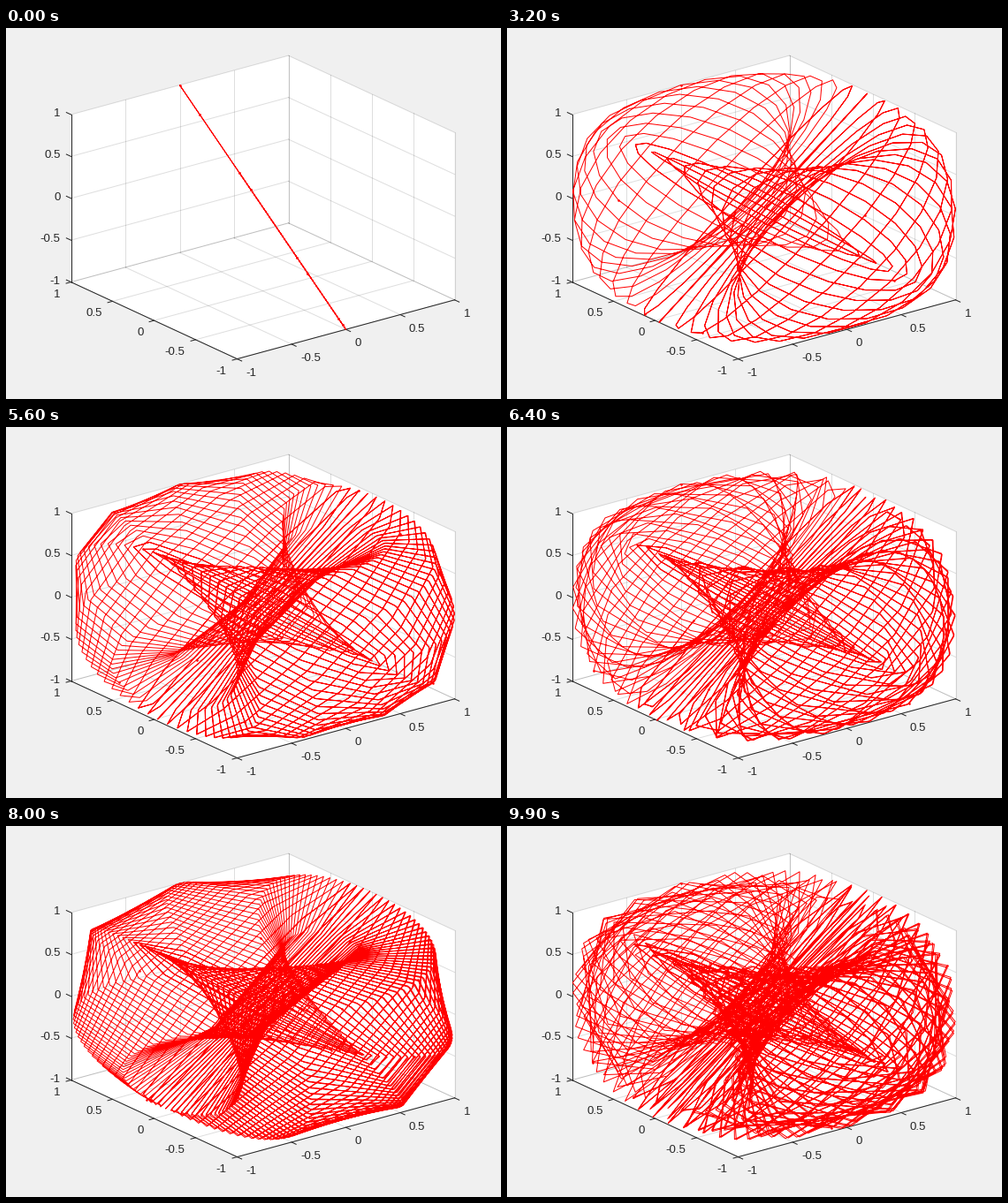
A matplotlib script for the animation above (10000 ms loop, 560 by 420 pixels).

```python
import numpy as np
import matplotlib.pyplot as plt
from matplotlib.animation import FuncAnimation

W, H, DPI = 560, 420, 100
PX = 72 / DPI  # one pixel in points
INK = "#262626"
TICKS = np.array([-1, -0.5, 0, 0.5, 1])

plt.rcParams["font.family"] = "Liberation Sans"
plt.rcParams["path.simplify"] = False


def project(x, y, z):
    """Orthographic view of the cube [-1, 1]^3 in stage pixels."""
    px = 290.5 + 123 * x - 94 * y
    py = 202.9 - 33.4 * x - 43.5 * y - 94.8 * z
    return px, py


fig = plt.figure(figsize=(W / DPI, H / DPI), dpi=DPI, facecolor="#f0f0f0")
ax = fig.add_axes([0, 0, 1, 1])
ax.set_xlim(0, W)
ax.set_ylim(H, 0)
ax.axis("off")


def line3(a, b, **style):
    ax.plot(*project(*np.array([a, b], float).T), lw=PX, **style)


def wall(corners):
    ax.fill(*project(*np.array(corners, float).T), color="white", lw=0)


def label(x, y, value, align):
    ax.text(x, y, f"{value:g}", ha=align, va="center_baseline",
            fontsize=13.2 * PX, color=INK)


wall([(-1, -1, -1), (1, -1, -1), (1, 1, -1), (-1, 1, -1)])
wall([(-1, 1, -1), (1, 1, -1), (1, 1, 1), (-1, 1, 1)])
wall([(1, -1, -1), (1, 1, -1), (1, 1, 1), (1, -1, 1)])

grid = dict(color=INK, alpha=0.15)
for v in TICKS:
    line3((v, -1, -1), (v, 1, -1), **grid)
    line3((-1, v, -1), (1, v, -1), **grid)
    line3((v, 1, -1), (v, 1, 1), **grid)
    line3((-1, 1, v), (1, 1, v), **grid)
    line3((1, v, -1), (1, v, 1), **grid)
    line3((1, -1, v), (1, 1, v), **grid)

axis = dict(color=INK, solid_capstyle="projecting")
line3((-1, -1, -1), (1, -1, -1), **axis)
line3((-1, -1, -1), (-1, 1, -1), **axis)
line3((-1, 1, -1), (-1, 1, 1), **axis)

TICK = 0.055
for v in TICKS:
    line3((v, -1, -1), (v, -1 - TICK, -1), **axis)
    line3((-1, v, -1), (-1 - TICK * 0.8, v, -1), **axis)
    line3((-1, 1, v), (-1, 1 + TICK, v), **axis)
    x, y = project(v, -1, -1)
    label(x + 10, y + 14.5, v, "left")
    x, y = project(-1, v, -1)
    label(x - 12, y + 12.5, v, "right")
    x, y = project(-1, 1, v)
    label(x - 12, y - 2.5, v, "right")

SPAN, PARTS, STEPS = 5, 14, 64
t = np.linspace(-SPAN, SPAN, PARTS * STEPS + 1)
curve, = ax.plot([], [], color="red", lw=PX, solid_joinstyle="round", zorder=5)
dots, = ax.plot([], [], "o", color="red", ms=2.6 * PX, mew=0, zorder=6)


def update(k):
    px, py = project(np.sin(k * t), np.cos(t), np.cos((k + 1) * t))
    curve.set_data(px, py)
    dots.set_data(px[::STEPS], py[::STEPS])
    return curve, dots


anim = FuncAnimation(fig, update, frames=100, interval=100,
                     repeat=True, repeat_delay=0)
plt.show()
```
